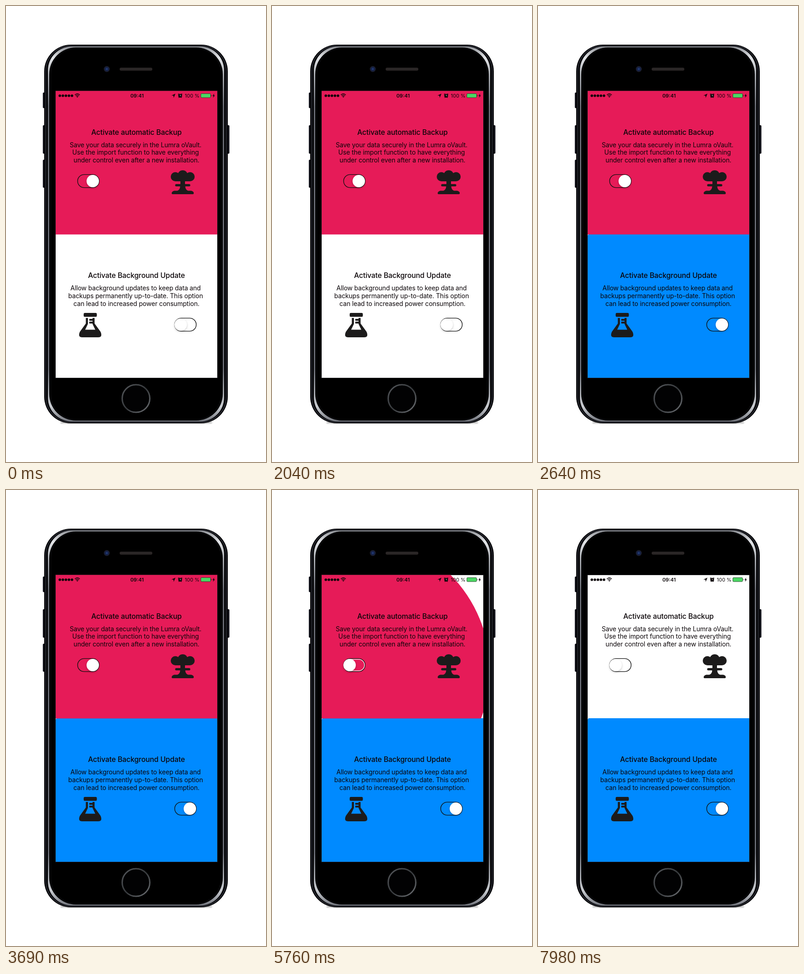
Write an HTML page that moves like this. It is 565x991 px and loops after 8000 ms.

```html
<!DOCTYPE html>
<html lang="en">
<head>
<meta charset="utf-8">
<title>Paper switches</title>
<style>
  html, body { margin: 0; height: 100%; overflow: hidden; background: #fff; }
  svg { display: block; width: 100vw; height: 100vh; }
  text { font-family: Inter, Roboto, sans-serif; fill: #0b0508; }
  .mid { text-anchor: middle; }
  .title { font-size: 15.6px; font-weight: 500; letter-spacing: -.1px; }
  .body { font-size: 13.8px; letter-spacing: -.08px; }
  .status { font-size: 10.9px; }
  .knob { fill: #fff; filter: drop-shadow(0 2.5px 2px rgba(0,0,0,.22)); }
  .track { fill: none; stroke: #111; stroke-width: 1.4; }
  .icon { fill: #1c1b1b; }
</style>
</head>
<body>
<svg viewBox="0 0 565 991">
  <defs>
    <linearGradient id="rim" x1="0" y1="0" x2="0" y2="1">
      <stop offset="0" stop-color="#8f9298"/>
      <stop offset=".03" stop-color="#e4e6e9"/>
      <stop offset=".08" stop-color="#a5a8ae"/>
      <stop offset=".16" stop-color="#666971"/>
      <stop offset=".86" stop-color="#666971"/>
      <stop offset=".96" stop-color="#c9ccd1"/>
      <stop offset="1" stop-color="#73767e"/>
    </linearGradient>
    <linearGradient id="ring" x1="0" y1="0" x2="1" y2="1">
      <stop offset="0" stop-color="#55585c"/>
      <stop offset=".5" stop-color="#36393c"/>
      <stop offset="1" stop-color="#6e7175"/>
    </linearGradient>
    <radialGradient id="lens">
      <stop offset="0" stop-color="#2a4785"/>
      <stop offset=".5" stop-color="#13204a"/>
      <stop offset="1" stop-color="#1d1d24"/>
    </radialGradient>
    <filter id="soft" x="-10%" y="-200%" width="120%" height="500%"><feGaussianBlur stdDeviation="1"/></filter>
    <clipPath id="top"><rect x="108" y="184.500" width="351" height="312"/></clipPath>
    <clipPath id="bottom"><rect x="108" y="496" width="351" height="312"/></clipPath>
  </defs>

  <!-- phone -->
  <rect x="118" y="904" width="330" height="3.500" rx="2" fill="#999" opacity=".6" filter="url(#soft)"/>
  <g fill="#12131b">
    <rect x="80" y="188" width="6" height="34" rx="2"/>
    <rect x="80" y="259" width="6" height="62" rx="2"/>
    <rect x="80" y="334" width="6" height="61" rx="2"/>
    <rect x="479" y="259" width="6.5" height="62" rx="2"/>
  </g>
  <rect x="83" y="84" width="399" height="823" rx="58" fill="#030305"/>
  <rect x="86.5" y="86.5" width="392" height="818" rx="55" fill="none" stroke="#2b2d35" stroke-width="2"/>
  <rect x="91" y="88" width="383" height="815" rx="52" fill="url(#rim)"/>
  <rect x="94" y="90" width="377" height="811" rx="58" fill="#000"/>
  <rect x="97" y="92" width="371" height="807" rx="55" fill="none" stroke="#15161b"/>
  <circle cx="219" cy="137" r="6.5" fill="url(#lens)"/>
  <rect x="247" y="134" width="71" height="6.5" rx="3.2" fill="#2a2626"/>
  <circle cx="282.5" cy="853" r="30" fill="#020203" stroke="url(#ring)" stroke-width="3"/>

  <!-- screen -->
  <rect x="107.5" y="184.500" width="352" height="624" fill="#fff" stroke="#1b1b1e"/>
  <g clip-path="url(#bottom)"><circle id="blue" cx="390" fill="#008aff"/></g>
  <g clip-path="url(#top)"><circle id="pink" cx="179" fill="#e61b58"/></g>

  <!-- status bar -->
  <g fill="#0b0508">
    <circle cx="117" cy="195" r="2.8"/><circle cx="123.6" cy="195" r="2.8"/>
    <circle cx="130.2" cy="195" r="2.8"/><circle cx="136.8" cy="195" r="2.8"/>
    <circle cx="143.4" cy="195" r="2.8"/>
    <path d="M155 199l-2-2.2q2-1.6 4 0z"/>
    <path d="M149.6 193.2q5.4-4.6 10.8 0M151.5 195.4q3.5-2.8 7 0" fill="none" stroke="#0b0508" stroke-width="1.5"/>
    <path d="M368.2 190.6l-3.8 8.8-.6-4.6-4.2-.4z"/>
    <path d="M374 192.2l2-1.8M383 192.2l-2-1.8M375.4 199.4l1-1.4M381.6 199.4l-1-1.4" stroke="#0b0508" stroke-width="1.3"/>
    <circle cx="378.5" cy="195" r="4.1"/>
    <path d="M378.5 192.6v2.6h2" fill="none" stroke="#ddd" stroke-width=".8"/>
    <rect x="423.4" y="190.5" width="21.2" height="8.6" rx="1.6" fill="#4bd763" stroke="#24442a" stroke-width=".9"/>
    <path d="M445.6 193.2q2 1.6 0 3.2z"/>
    <path d="M452.6 190.2l-4 5.2h2.4l-1.2 4 4.2-5.2h-2.4z"/>
  </g>
  <text class="status mid" x="284.7" y="199" font-weight="600">09:41</text>
  <text class="status" x="388.6" y="199">100 %</text>

  <!-- upper panel -->
  <text class="title mid" x="283.5" y="279.5">Activate automatic Backup</text>
  <text class="body mid">
    <tspan x="283.5" y="306.5">Save your data securely in the Lumra oVault.</tspan>
    <tspan x="283.5" y="323.2">Use the import function to have everything</tspan>
    <tspan x="283.5" y="339.8">under control even after a new installation.</tspan>
  </text>
  <g class="icon">
    <circle cx="368" cy="371" r="10"/><circle cx="384" cy="368" r="11"/><circle cx="400" cy="371" r="10"/>
    <rect x="368" y="371" width="32" height="10"/>
    <rect x="379" y="378" width="10" height="10"/>
    <rect x="367.5" y="387" width="33" height="5" rx="2.5"/>
    <path d="M378.5 391h11q0 8 6 10.5h7q6 1.500 5.500 5.500 0 2-3 2h-42q-3 0-3-2 0-4 5.500-5.500h7q6-2.500 6-10.500z"/>
  </g>
  <rect class="track" x="155.6" y="366.4" width="46.8" height="28.2" rx="14.1"/>
  <rect id="flash" x="157" y="368" width="44" height="25" rx="12.5" fill="none" stroke="#fff" stroke-width="1.5"/>
  <circle class="knob" id="knobTop" cy="380.5" r="13.5"/>

  <!-- lower panel -->
  <text class="title mid" x="283.5" y="591.3">Activate Background Update</text>
  <text class="body mid">
    <tspan x="283.5" y="618.3">Allow background updates to keep data and</tspan>
    <tspan x="283.5" y="635">backups permanently up-to-date. This option</tspan>
    <tspan x="283.5" y="651.6">can lead to increased power consumption.</tspan>
  </text>
  <g class="icon">
    <rect x="168.8" y="667" width="28.6" height="8.6" rx="2.5"/>
    <path fill-rule="evenodd" d="M173.5 678h19v12l13 18q5 12-5 12h-35q-10 0-5-12l13-18zM178 678v13l-6 12.500h22l-6-12.500v-1h-7v-4h7v-2h-7v-4h7v-2z"/>
  </g>
  <rect class="track" x="366.6" y="678.4" width="46.8" height="28.2" rx="14.1"/>
  <circle class="knob" id="knobBottom" cy="692.5" r="13.5"/>
</svg>
<script>
  const LOOP = 8000, FULL = 350, GROW = 415;
  const TURN_ON = 2065, TURN_OFF = 5720;
  const el = id => document.getElementById(id);
  const clamp = v => Math.min(1, Math.max(0, v));
  const phase = (t, start, length) => clamp((t - start) / length);
  const smooth = p => p * p * (3 - 2 * p);

  // cubic-bezier(0, 0, .58, 1)
  function easeOut(p) {
    let lo = 0, hi = 1, u = p;
    for (let i = 0; i < 24; i++) {
      u = (lo + hi) / 2;
      if (1.74 * u * u * (1 - u) + u ** 3 < p) lo = u; else hi = u;
    }
    return smooth(u);
  }

  // the paper circle sinks a little as it grows
  function spread(id, cy, scale) {
    const r = FULL * scale;
    el(id).setAttribute('r', r);
    el(id).setAttribute('cy', cy + r * .037);
  }

  function draw(now) {
    const t = now % LOOP;
    const off = phase(t, TURN_OFF, GROW), on = phase(t, TURN_ON, GROW);
    spread('pink', 381, off < 1 ? 1 - easeOut(off) : 0);
    spread('blue', 693, on > 0 ? 1 - easeOut(1 - on) : 0);
    el('knobTop').setAttribute('cx', 188.6 - 20 * smooth(phase(t, TURN_OFF - 110, 145)));
    el('knobBottom').setAttribute('cx', 379.6 + 20 * smooth(phase(t, TURN_ON - 20, 150)));
    const glow = phase(t, TURN_OFF - 80, 80) * (1 - phase(t, TURN_OFF + 60, 120));
    el('flash').setAttribute('opacity', glow * .85);
    requestAnimationFrame(draw);
  }
  draw(0);
</script>
</body>
</html>
```
